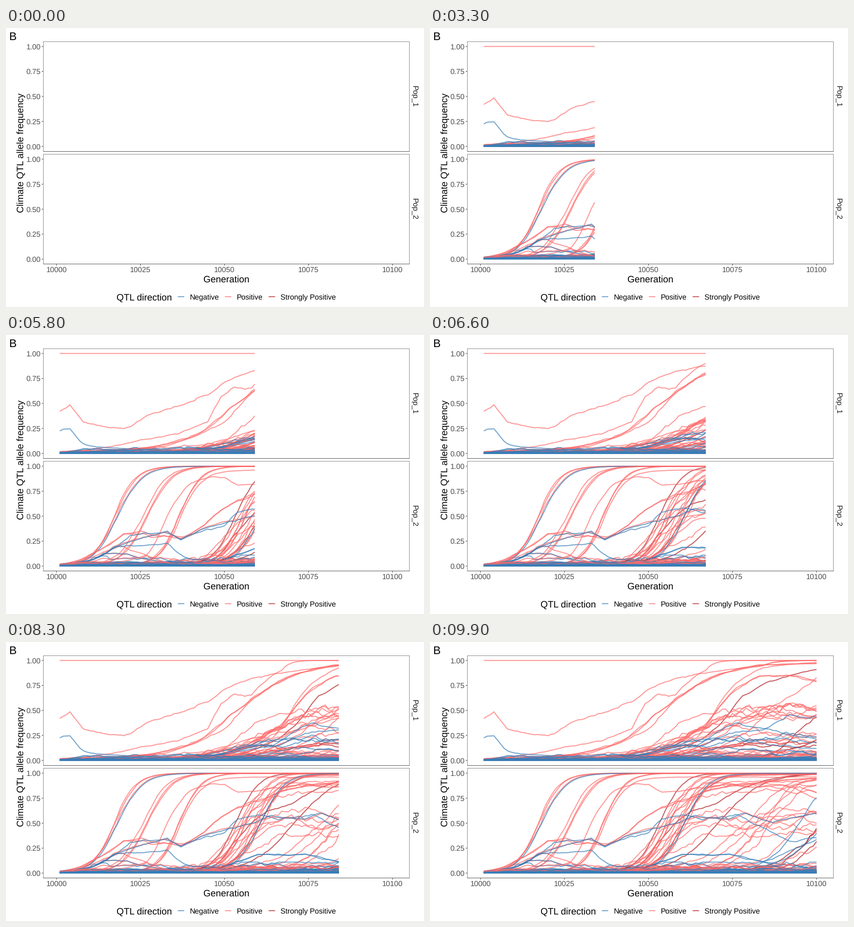
Recreate the animation shown at these times as a matplotlib script. Size 900x600 px, loop 10 s.

```python
import numpy as np
import matplotlib.pyplot as plt
from matplotlib.animation import FuncAnimation
from matplotlib.collections import LineCollection

W, H, DPI = 900, 600, 100
PX = 72 / DPI                      # points per pixel
GENS = np.arange(1, 101)
NEG, POS, STRONG = "#377EB8", "#FF6A6A", "#B2181C"
ALPHA, LINE_W = 0.7, 2.1
ZERO_Y = {1: 254.6, 2: 497.0}      # pixel row of frequency 0 in each panel
UNIT_Y = 214.9

plt.rcParams.update({"font.family": "Liberation Sans", "text.hinting": "none"})
rng = np.random.default_rng(12)
lines, colors = [], []


def gen_x(g):
    return 108.6 + 7.237 * np.asarray(g, float)


def freq_y(pop, p):
    return ZERO_Y[pop] - UNIT_Y * np.asarray(p, float)


def logit(p):
    p = np.clip(p, 0.002, 0.9995)
    return np.log(p / (1 - p))


def wander(sd, keep):
    out = np.zeros(GENS.size)
    for i, step in enumerate(rng.normal(0, sd, GENS.size - 1), 1):
        out[i] = keep * out[i - 1] + step
    return out


def add(pop, kind, freq):
    lines.append(np.column_stack([gen_x(GENS), freq_y(pop, freq)]))
    colors.append(kind)


def add_odds(pop, kind, z):
    add(pop, kind, 1 / (1 + np.exp(-z)))


def path(pop, kind, *keys, noise=0.025):
    """Curve through (generation, percent) keys, joined on a logit scale."""
    z = np.interp(GENS, keys[::2], logit(np.array(keys[1::2]) / 100))
    add_odds(pop, kind, z + wander(noise, 0.8))


def sweep(pop, kind, mid, width, top=1.0, noise=0.03):
    """Logistic rise from a rare start, levelling off at top."""
    rise = np.logaddexp((GENS - mid) / width, np.log(0.005))
    add_odds(pop, kind, -np.logaddexp(-rise, -logit(top)) + wander(noise, 0.93))


def cluster(pop, kind, count, mids, tops, width):
    for mid, top in zip(np.linspace(*mids, count), np.linspace(*tops, count)):
        sweep(pop, kind, mid, width * rng.uniform(0.85, 1.15), top, 0.07)


def drift(pop, kind, count, level):
    """Rare alleles wandering just above zero."""
    for _ in range(count):
        base = min(rng.exponential(level), 3 * level)
        ramp = np.minimum(1, 0.35 + GENS / 14) + 0.8 * (GENS / 100) ** 2
        add(pop, kind, np.clip(base * ramp * np.exp(wander(0.13, 0.95)), 0, 0.11))


# ---- population 1
path(1, STRONG, 1, .5, 45, 2, 64, 17, 70, 33, 78, 64, 85, 77, 100, 91)
cluster(1, STRONG, 2, (97, 100), (.5, .2), 4)
cluster(1, STRONG, 2, (56, 72), (.15, .17), 6)
add(1, POS, np.ones(GENS.size))
path(1, POS, 1, 42, 4, 48, 8, 31, 12, 27, 20, 24, 28, 38, 38, 49, 48, 65, 57, 80,
     74, 91, 84, 95, 100, 100)
path(1, POS, 1, 1, 12, 5, 25, 13, 40, 25, 45, 32, 49, 54, 53, 66, 58, 65, 67, 90,
     78, 100, 100, 100)
for _ in range(2):
    path(1, POS, 1, 1, 30, 7, 44, 23, 52, 47, 59, 64, 68, 81, 83, 95.5, 100, 97)
    path(1, POS, 1, .5, 46, 5, 62, 25, 67, 35, 74, 65, 83, 84, 94, 84, 100, 79)
path(1, POS, 1, 1, 30, 6, 44, 22, 50, 33, 58, 61, 66, 79, 84, 95, 100, 100)
path(1, POS, 1, .5, 46, 4, 62, 23, 67, 36, 74, 70, 84, 92, 100, 98)
cluster(1, POS, 9, (61, 74), (.55, .42), 7)
cluster(1, POS, 5, (70, 84), (.3, .2), 7)
sweep(1, POS, 88, 8, noise=.05)
path(1, NEG, 1, 22.5, 2, 24, 4, 25, 6, 17, 8, 10, 12, 6.5, 20, 5, 30, 3, 100, 1)
path(1, NEG, 1, 1, 40, 3, 57, 14, 64, 14, 70, 26, 76, 37, 84, 32, 93, 25, 100, 22)
path(1, NEG, 1, 1, 40, 3, 58, 11, 66, 15, 74, 26, 84, 30, 92, 43, 100, 45)
cluster(1, NEG, 4, (62, 72), (.24, .1), 7)

# ---- population 2
for mid, width in ((53.1, 3.3), (61, 4.2), (71, 6.5)):
    sweep(2, STRONG, mid, width)
path(2, STRONG, 1, .5, 44, 3, 52, 28, 57, 47, 62, 61, 70, 70, 80, 87, 100, 99)
cluster(2, STRONG, 3, (100.5, 105), (1, 1), 5.5)

sweep(2, POS, 17.1, 3.2)
sweep(2, POS, 17.6, 3.1)
for kind in (POS, NEG):
    sweep(2, kind, 18.2, 3.6)
for mid in (25.8, 26.7, 26.9):
    sweep(2, POS, mid, 3.6)
for top in (1, 1, .96):
    sweep(2, POS, 36.8, 3.2, top)
path(2, POS, 1, 1, 20, 5, 27, 12, 33, 52, 40, 83, 46, 89.5, 50, 88.5, 54, 80, 59, 81,
     74, 89, 80, 85, 90, 88, 100, 74)
for _ in range(2):
    path(2, POS, 1, 2, 10, 11, 20, 32, 26, 33, 28, 30, 38, 29, 44, 42, 49, 56, 58, 71,
         74, 87, 100, 95)
path(2, POS, 1, 2, 14, 14, 19, 20, 26, 12, 33, 4, 100, 1)
cluster(2, POS, 5, (55, 61), (1, .98), 3.6)
cluster(2, POS, 4, (54, 58), (.9, .84), 3.4)
cluster(2, POS, 5, (54, 62), (.64, .4), 4)
cluster(2, POS, 4, (79, 86), (.98, .95), 6)
cluster(2, POS, 3, (82, 98), (.6, .4), 5)

path(2, NEG, 1, 1, 14, 12, 22, 31, 28, 32, 32, 36, 37, 27, 45, 40, 50, 43, 54, 55, 60, 60,
     66, 55, 76, 58, 84, 45, 92, 30, 100, 34)
for kind in (POS, NEG):
    path(2, kind, 1, 1, 17, 19, 23, 26, 33, 34, 37, 27, 45, 40, 59, 50, 64, 56, 74, 54,
         79, 60, 87, 51, 100, 60, noise=.015)
    path(2, kind, 1, 1, 14, 12, 21, 12, 32, 4, 100, 1)
path(2, NEG, 1, 1, 17, 19, 22, 21, 33, 22, 39, 8, 60, 2, 100, 1)
for end in (5, 34):
    path(2, NEG, 1, 1, 46, 3, 53, 11, 60, 18, 74, 19, 84, 12, 100, end)
for mid, width in ((60.5, 3.5), (95, 5), (103, 7)):
    sweep(2, NEG, mid, width)

# ---- rare alleles
for pop in (1, 2):
    drift(pop, STRONG, 4, 0.008)
    drift(pop, POS, 30, 0.014)
    drift(pop, NEG, 12, 0.014)
    drift(pop, POS, 10, 0.012)
    drift(pop, NEG, 22, 0.007)

# ---- stage
fig = plt.figure(figsize=(W / DPI, H / DPI), dpi=DPI, facecolor="white")
ax = fig.add_axes([0, 0, 1, 1])
ax.set_xlim(0, W)
ax.set_ylim(H, 0)
ax.axis("off")


def text(x, y, s, size, color="black", ha="left", rotation=0):
    ax.text(x, y, s, fontsize=size * PX, color=color, ha=ha, va="baseline",
            rotation=rotation, rotation_mode="anchor")


def rule(xs, ys, color="#333333", width=1.0, **kw):
    ax.plot(xs, ys, color=color, lw=width * PX, solid_capstyle="butt", snap=False, **kw)


LEFT, RIGHT = 80.5, 868.5
for pop, top, bottom in ((1, 29.5, 265.5), (2, 271.5, 507.5)):
    rule([LEFT, LEFT, RIGHT, RIGHT], [bottom, top, top, bottom], "#858585", zorder=3)
    rule([LEFT - .5, RIGHT + .5], [bottom, bottom], "#505050", zorder=3)
    for v in (0, .25, .5, .75, 1):
        y = freq_y(pop, v)
        rule([77, 80], [y, y])
        text(75, y + 5.8, f"{v:.2f}", 16, "#4D4D4D", "right")
    text(875, (top + bottom) / 2 - .3, f"Pop_{pop}", 16, "#1A1A1A", "center", 270)

for g in range(0, 101, 25):
    rule([gen_x(g)] * 2, [508, 511])
    text(gen_x(g), 525, str(10000 + g), 16, "#4D4D4D", "center")

text(6, 25.5, "B", 24)
text(474.5, 547, "Generation", 20, ha="center")
text(37.5, 268.5, "Climate QTL allele frequency", 20, ha="center", rotation=90)
text(237.5, 586, "QTL direction", 20)
for x, kind, label in ((370, NEG, "Negative"), (471.3, POS, "Positive"),
                       (565.5, STRONG, "Strongly Positive")):
    rule([x, x + 13.8], [577.8, 577.8], kind, LINE_W, alpha=ALPHA)
    text(x + 25.3, 584, label, 16)

traces = np.array(lines)
curves = LineCollection([], colors=colors, linewidths=LINE_W * PX, alpha=ALPHA,
                        capstyle="butt", joinstyle="round", snap=False, zorder=2)
ax.add_collection(curves, autolim=False)


def update(i):
    curves.set_segments(list(traces[:, :i + 1]) if i else [])
    return (curves,)


anim = FuncAnimation(fig, update, frames=100, interval=100, repeat=True,
                     cache_frame_data=False)
plt.show()
```
